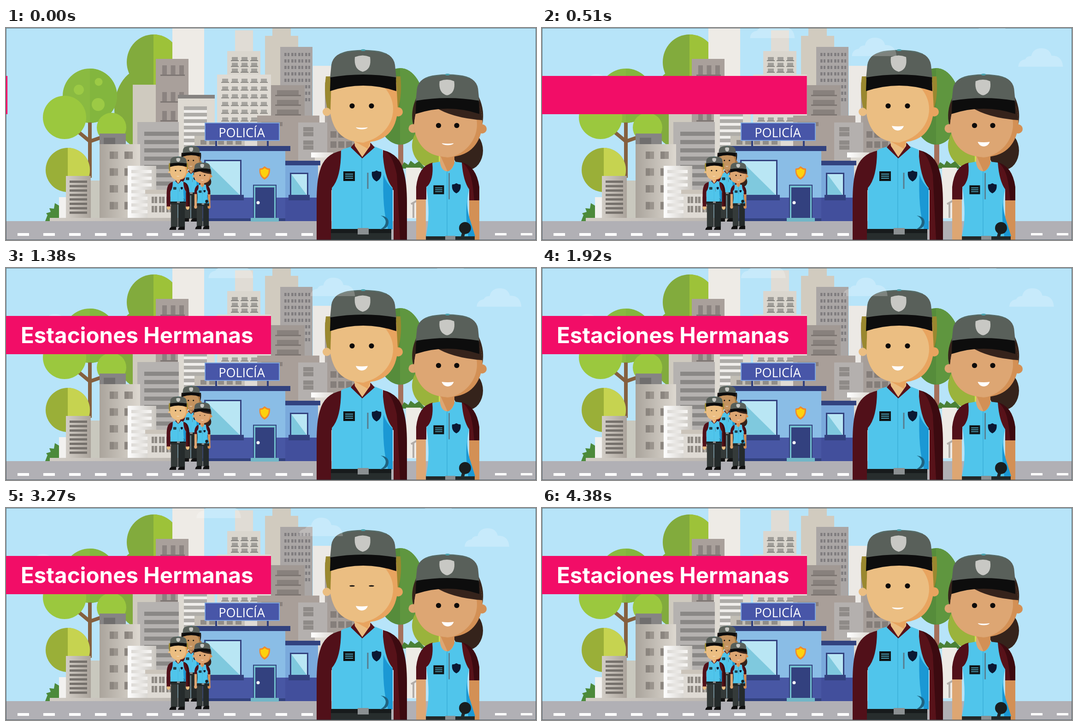
These frames come from a looping animation (1150 by 460 pixels, 4.5 s). An HTML page with a canvas:

```html
<!DOCTYPE html>
<html lang="es">
<head>
<meta charset="utf-8">
<style>
html, body { margin: 0; width: 100%; height: 100%; overflow: hidden; }
canvas { display: block; width: 1150px; height: 460px; }
</style>
</head>
<body>
<canvas id="stage" width="1150" height="460"></canvas>
<script>
const LOOP = 4500;
const TITLE = 'Estaciones Hermanas';
const view = document.getElementById('stage').getContext('2d');
const scene = document.createElement('canvas');
scene.width = 1150;
scene.height = 460;
let g = scene.getContext('2d');

// Drawing helpers; boxes take left, top, right, bottom.
function box(l, t, r, b, fill) {
  g.fillStyle = fill;
  g.fillRect(l, t, r - l, b - t);
}
function path(d, fill) {
  g.fillStyle = fill;
  g.fill(new Path2D(d));
}
function oval(x, y, rx, ry, fill) {
  g.fillStyle = fill;
  g.beginPath();
  g.ellipse(x, y, rx, ry, 0, 0, Math.PI * 2);
  g.fill();
}
function line(d, stroke, width) {
  g.strokeStyle = stroke;
  g.lineWidth = width;
  g.stroke(new Path2D(d));
}
function fade(l, r, a, b) {
  const f = g.createLinearGradient(l, 0, r, 0);
  f.addColorStop(0, a);
  f.addColorStop(1, b);
  return f;
}
function clipTo(d, draw) {
  g.save();
  g.clip(new Path2D(d));
  draw();
  g.restore();
}
function grid(x, y, cols, rows, dx, dy, w, h, fill) {
  for (let r = 0; r < rows; r++)
    for (let c = 0; c < cols; c++)
      box(x + c * dx, y + r * dy, x + c * dx + w, y + r * dy + h, fill);
}
// Moves and scales so that (ax, ay) lands on (x, y).
function placed(x, y, s, ax, ay, draw) {
  g.save();
  g.translate(x, y);
  g.scale(s, s);
  g.translate(-ax, -ay);
  draw();
  g.restore();
}

function crown(x, y, rx, ry, left, right) {
  oval(x, y, rx, ry, left);
  g.fillStyle = right;
  g.beginPath();
  g.ellipse(x, y, rx, ry, 0, -Math.PI / 2, Math.PI / 2);
  g.fill();
}

function trees() {
  oval(300, 175, 65, 88, '#82ab3d');
  crown(320, 74, 58, 60, '#82ab3d', '#9dc239');
  crown(182, 147, 59, 59, '#8aba41', '#83b63e');
  oval(158, 134, 11, 11, '#9cca45');
  oval(201, 117, 8.5, 8.5, '#9cca45');
  oval(200, 166, 14, 14, '#9cca45');
  line('M182 205V325M159 227L182 246L205 238', '#85603f', 8);
  oval(127, 194, 47, 47, '#9bc83e');
  oval(229, 216, 32, 32, '#9bc83e');
  crown(134, 308, 48, 48, '#9aaf38', '#c6d350');
  path('M85 419L90 406L87 402L97 399L94 391L104 392L106 380L116 386V419Z', '#4c8a3b');

  box(851, 245, 862, 305, '#a5715c');
  crown(855, 170, 53, 83, '#568c3b', '#5f963f');
  oval(931, 255, 50, 50, '#9ab33c');
  box(939, 278, 948, 291, '#d0dc50');
  path('M855 305L864 291L873 297L878 288L887 295L896 289L911 305Z', '#4a8136');
}

function city() {
  box(361, 0, 430, 200, '#eeebe6');
  box(578, 0, 618, 20, '#d1cbbf');
  box(562, 17, 634, 210, '#d1cbbf');
  box(497, 5, 536, 55, '#e0dcd5');
  box(480, 50, 552, 104, '#dad6ce');
  box(458, 101, 575, 256, '#dfdbd4');
  grid(490, 63, 3, 3, 21, 12.5, 13, 8, '#a09e99');
  grid(488, 70, 3, 3, 21, 12.5, 17, 2, '#85837f');
  grid(469, 110, 5, 6, 21, 16.8, 13, 8, '#a6a49f');
  grid(467, 117, 5, 6, 21, 16.8, 17, 2, '#8b8984');
  box(666, 82, 705, 270, '#ece9e5');
  box(692, 118, 720, 270, '#aaa39e');
  box(595, 41, 665, 205, '#aaa6a5');
  grid(604, 54, 4, 8, 15, 14, 11, 7, '#817e80');
  grid(609, 54, 4, 8, 15, 14, 1.5, 7, '#bcb8b6');

  box(575, 124, 648, 195, '#a19994');
  for (const y of [135, 156, 177]) {
    box(588, y, 635, y + 13, '#88817d');
    box(584, y + 10, 640, y + 13, '#7d7672');
  }
  box(545, 190, 680, 292, '#a99f99');
  box(554, 204, 600, 213, '#8b827e');
  box(634, 205, 697, 292, '#b4b0ae');
  grid(645, 215, 1, 2, 0, 29, 22, 20, '#8f8b88');
  box(645, 224, 667, 226, '#aaa5a2');
  box(645, 253, 667, 255, '#aaa5a2');
  box(697, 190, 760, 275, '#a69e99');
  grid(704, 224, 3, 2, 17, 22, 13, 14, '#857e7a');
  box(662, 270, 710, 281, fade(662, 710, '#fff', '#ddd9d4'));
  box(670, 281, 710, 412, '#dedad4');

  box(275, 123, 330, 300, '#cfcabf');
  box(325, 67, 396, 210, '#a9a09b');
  for (const y of [81, 139, 180]) {
    grid(339, y, 3, 1, 18.5, 0, 10, 21, '#8b8380');
    box(335, y + 20, 388, y + 23, '#7e7774');
  }
  box(373, 148, 453, 300, '#dedad2');
  box(373, 145, 453, 153, '#858280');
  box(386, 170, 436, 300, '#f0eeeb');
  grid(386, 170, 1, 9, 0, 14, 50, 8, '#aeaca8');
  box(409, 234, 518, 258, '#c3bfb6');
  grid(422, 243, 5, 1, 19, 0, 13, 10, '#908d88');
  box(285, 204, 375, 352, '#b5b2b0');
  grid(300, 225, 1, 7, 0, 18, 75, 9, '#8a8886');

  box(203, 229, 260, 255, '#868484');
  box(212, 238, 237, 252, '#706e6e');
  box(203, 252, 291, 413, fade(203, 291, '#aaa49c', '#ddd8d0'));
  grid(225, 268, 2, 4, 32, 36.5, 18, 16, '#9a948d');
  grid(225, 268, 2, 4, 32, 36.5, 9, 16, '#8b857f');
  box(184, 331, 203, 413, '#c9c8be');
  box(115, 367, 131, 413, '#f2f1ef');
  box(130, 321, 184, 413, fade(130, 184, '#d2cdc6', '#aaa39b'));
  grid(138, 331, 1, 8, 0, 9.6, 38, 5, '#76716c');
  box(264, 299, 326, 413, fade(264, 326, '#ffffff', '#c9c5bf'));
  grid(272, 308, 1, 7, 0, 14.5, 44, 7, fade(272, 316, '#dcd9d5', '#f8f7f5'));
  box(302, 351, 360, 360, '#cbc4ba');
  box(307, 360, 360, 413, '#dedad4');
  grid(316, 366, 3, 2, 16, 20, 12, 14, '#8f8a84');
  grid(321, 366, 3, 2, 16, 20, 1.5, 14, '#dedad4');
  box(95, 412, 420, 419, fade(95, 420, '#d1ccc5', '#b8b3ad'));

  box(868, 303, 900, 413, '#eeebe6');
  line('M879 382L900 370M884 380V412', '#b2aca8', 4);
}

function pane(l, t, r, b) {
  box(l - 3, t - 3, r + 3, b + 3, '#33427f');
  box(l, t, r, b, '#b9e6f4');
  path(`M${l} ${t}L${r} ${b}H${l}Z`, '#7fc9de');
}

function station() {
  box(606, 297, 677, 419, '#7aa9dc');
  box(606, 368, 677, 419, '#424f9c');
  box(606, 288, 682, 298, '#32427f');
  pane(619, 317, 653, 363);
  box(613, 362, 659, 374, '#33427f');

  box(413, 264, 606, 419, '#8abde6');
  box(413, 368, 606, 419, '#4857a4');
  box(412, 413, 606, 419, '#32427f');
  box(408, 256, 617, 267, '#32427f');
  pane(433, 289, 508, 363);
  box(422, 362, 516, 374, '#33427f');

  box(536, 340, 587, 413, '#33427f');
  box(538, 342, 585, 413, '#72c0cf');
  box(541, 346, 582, 413, '#33417f');
  box(531, 412, 592, 420, '#72b7c8');
  oval(547, 379, 3.5, 3.5, '#fff');
  path('M561 300L567 304L573 305Q574 322 561 329Q548 322 550 305L556 304Z', '#f08a2b');
  path('M561 304L566 307L570 308Q570 320 561 325Q552 320 552 308L557 307Z', '#fdd20d');

  box(454, 244, 458, 257, '#33427f');
  box(566, 244, 570, 257, '#33427f');
  box(431, 205, 594, 245, '#7ea6de');
  box(433, 207, 592, 243, '#4856a8');
  g.fillStyle = '#fff';
  g.textAlign = 'center';
  g.font = '27px "Open Sans", "Noto Sans", sans-serif';
  g.fillText('POLICÍA', 511.5, 237);
}

function road() {
  box(0, 419, 1150, 460, '#b1b0b5');
  for (let x = -31; x < 700; x += 56) box(x, 445, x + 25, 451, '#fff');
  box(1061, 445, 1086, 450, '#fff');
  box(1117, 445, 1142, 450, '#fff');
}

function cap() {
  path('M703 110L706 80Q710 53 750 49Q775 46 800 49Q840 53 844 80L847 110Z', '#59605a');
  line('M725 56Q775 41 826 56', '#4e7774', 1);
  oval(775, 48, 5, 2, '#4aa3ae');
  path('M704 107Q775 95 846 107L847 137Q775 113 703 137Z', '#0d0d0d');
  path('M757 63Q774 56 790 63Q794 90 774 95Q754 90 757 63Z', '#c8c8c4');
}

function gear(x, y, zx, zy, zh, bx, by) {
  box(x, y, x + 25, y + 21, '#101517');
  for (let i = 0; i < 3; i++) box(x + 4, y + 5 + i * 4.5, x + 21, y + 7 + i * 4.5, '#4a9db5');
  box(zx - 1.5, zy, zx + 1.5, zy + zh, '#587d8e');
  placed(bx, by, 1, 0, 0, () =>
    path('M-10 -9Q-4 -9 0 -12Q4 -9 10 -9Q12 6 0 12Q-12 6 -10 -9Z', '#0b1833'));
}

function legs(x, y, w, end) {
  for (const s of [-1, 1]) {
    const mid = x + s * w / 4;
    box(mid - w / 4 + 2, y, mid + w / 4 - 2, end, s < 0 ? '#343a39' : '#252b2b');
    path(`M${mid - w / 4 - (s < 0 ? 12 : 0)} ${end + 24}q4 -26 28 -28h${w / 4}v28Z`, '#111');
  }
}

function man(skin, shade, hair) {
  legs(771, 440, 124, 655);
  for (const x of [690, 855]) oval(x, 484, 16, 22, skin);
  path('M728 266Q690 274 681 310Q674 332 674 375V478H706V352L730 330Z', '#511019');
  path('M818 265Q855 274 863 312Q870 335 870 380V478H841V352L818 330Z', '#3c0a10');
  path('M818 265Q838 270 848 318L856 478H841V352L818 330Z', '#571219');
  path('M731 263L756 255L773 283L792 254L817 264Q820 325 839 347V437H707V347Q727 325 727 266Z', '#50c5eb');
  path('M819 318Q825 336 839 349V437H829Q816 390 819 318Z', '#1b98d4');
  line('M772 281V437', '#34a8d3', 1.2);
  path('M748 259L757 249L773 272L791 249L800 259L773 283Z', '#571219');
  path('M755 240H791L790 256L773 280L757 256Z', skin);
  path('M756 246Q775 252 791 245L785 262Z', shade);
  gear(732, 311, 785, 314, 35, 804, 321);
  box(705, 436, 836, 460, '#272d2d');
  box(705, 436, 836, 445, '#171b1c');
  box(763, 434, 787, 448, '#8b9092');
  path('M813 407Q831 409 830 423Q828 437 811 437Q824 431 824 420Q823 411 813 407Z', '#1f6381');

  path('M694 105H856Q860 145 850 178H698Q689 145 694 105Z', hair);
  oval(696, 182, 9, 9, skin);
  oval(851, 182, 10, 10, shade);
  const face = 'M706 118H847L850 175Q846 248 776 248Q714 248 704 185Z';
  clipTo(face, () => {
    box(700, 110, 860, 250, shade);
    oval(757, 176, 83, 74, skin);
  });
  cap();
}

function woman() {
  const skin = '#dda673', shade = '#d39055', hair = '#35231b';
  legs(962, 450, 108, 650);
  oval(1002, 266, 33, 42, hair);
  box(890, 365, 911, 480, skin);
  box(1005, 365, 1027, 480, shade);
  oval(900, 482, 13, 16, skin);
  oval(1016, 482, 13, 16, shade);
  path('M926 292Q895 299 890 345V372H912V345L930 330Z', '#511019');
  path('M987 291Q1021 299 1027 345V374H1005V350L986 330Z', '#3c0a10');
  path('M987 291Q1007 299 1013 345L1016 374H1005V350L986 330Z', '#571219');
  path('M925 293L942 290L957 311L973 290L989 292Q992 332 1005 350Q996 384 1008 420L1018 452H911Q922 406 912 346Q929 330 925 293Z', '#50c5eb');
  path('M1002 365Q997 390 1008 420L1018 452H1003Q995 400 1002 365Z', '#1b98d4');
  line('M957 310V452', '#34a8d3', 1.2);
  path('M942 265H973V293Q968 310 957 311Q945 310 942 293Z', skin);
  path('M943 278Q960 284 973 277V293Q966 310 958 311Z', shade);
  placed(939, 351, .92, 744.5, 321.5, () => gear(732, 311, 769, 282, 62, 786, 318));
  box(912, 452, 1017, 475, '#222828');
  box(953, 451, 975, 464, '#8b9092');
  line('M994 440L986 470', '#20282b', 7);
  oval(996, 434, 13, 13, '#191e20');

  path('M891 150H1026Q1040 180 1033 212H884Q876 182 891 150Z', hair);
  oval(883, 218, 9.5, 9.5, skin);
  oval(1033, 219, 10, 10, shade);
  const face = 'M894 170H1028Q1034 185 1034 212Q1024 280 957 280Q895 278 885 214Q887 186 894 170Z';
  clipTo(face, () => {
    box(880, 160, 1040, 285, shade);
    oval(944, 209, 78, 74, skin);
    path('M925 168Q966 196 1036 200V160Z', hair);
  });
  placed(958, 101, .96, 775, 48, cap);
}

function eyes(x1, x2, y, open) {
  for (const x of [x1, x2]) oval(x, y, 5.6, 5.6 * open, '#0d0b0a');
}
function smile(x, y, open) {
  const top = y - 3 * open, d = 5.8 + 7.5 * open;
  path(`M${x - 13} ${top}Q${x} ${top + 2} ${x + 13} ${top}C${x + 9} ${top + d} ${x - 9} ${top + d} ${x - 13} ${top}Z`, '#fff');
}
const manFace = (open, grin) => { eyes(751, 793, 169, open); smile(772, 215.5, grin); };
const womanFace = (open, grin) => { eyes(938.5, 978, 211.5, open); smile(958.5, 250, grin); };

const asMid = draw => placed(402, 256, .26, 775, 48, draw);
const asLeft = draw => placed(374, 279, .252, 775, 48, draw);
const asRight = draw => placed(426, 292, .252, 958, 101, draw);

function paintScene() {
  box(0, 0, 1150, 460, '#b7e4f9');
  trees();
  city();
  road();
  station();
  asMid(() => man('#c4935f', '#a97745', '#1d1714'));
  asLeft(() => man('#ebbe82', '#e8a45f', '#9a882f'));
  asRight(woman);
  man('#ebbe82', '#e8a45f', '#9a882f');
  woman();
  g.strokeStyle = 'rgba(50,70,80,.7)';
  g.lineWidth = 1;
  g.strokeRect(.5, .5, 1149, 459);
}

const clamp = v => Math.min(1, Math.max(0, v));
const ramp = (t, a, b) => clamp((t - a) / (b - a));

// Every face blinks twice, 2370 ms apart.
function lids(t, first) {
  const gap = Math.min(Math.abs(t - first), Math.abs(t - first - 2370));
  return Math.max(.27, clamp(gap / 90));
}

// Place at 900 ms: left edge, base line, scale.
const CLOUDS = [[63, 140, 1], [446, 22, 1], [667, 61, 1], [942, 1.5, .6], [1028, 84, 1]];
function clouds(t) {
  g.globalAlpha = .22 * ramp(t, 270, 420) * (1 - ramp(t, 4200, 4320));
  for (const [x, y, s] of CLOUDS)
    placed(x - (t - 900) * .0139, y, s, 0, 0, () =>
      path('M0 0Q1 -14 15 -16Q19 -24 28 -23Q32 -40 50 -40Q68 -40 72 -24Q95 -25 97 0Z', '#fff'));
  g.globalAlpha = 1;
}

function banner(t) {
  const width = 575 * (1 - (1 - clamp(t / 555)) ** 3);
  box(0, 104, width, 187, '#f20d67');
  const count = Math.max(0, Math.floor((t - 525) / 40) + 1);
  g.fillStyle = '#fff';
  g.textAlign = 'left';
  g.font = '700 47.5px Inter, "Open Sans", sans-serif';
  g.fillText(TITLE.slice(0, count), 32, 162.5);
}

function frame(now) {
  const t = now % LOOP;
  const shut = 1 - ramp(t, 4290, 4380);
  g.drawImage(scene, 0, 0);
  asMid(() => manFace(lids(t, 330), 0));
  asLeft(() => manFace(lids(t, 1850), 0));
  asRight(() => womanFace(lids(t, 1420), 0));
  manFace(lids(t, 900), ramp(t, 60, 210) * shut);
  womanFace(lids(t, 1600), ramp(t, 270, 450) * shut);
  clouds(t);
  banner(t);
}

paintScene();
g = view;
const start = performance.now();
function tick() {
  frame(performance.now() - start);
  requestAnimationFrame(tick);
}
tick();
</script>
</body>
</html>
```
